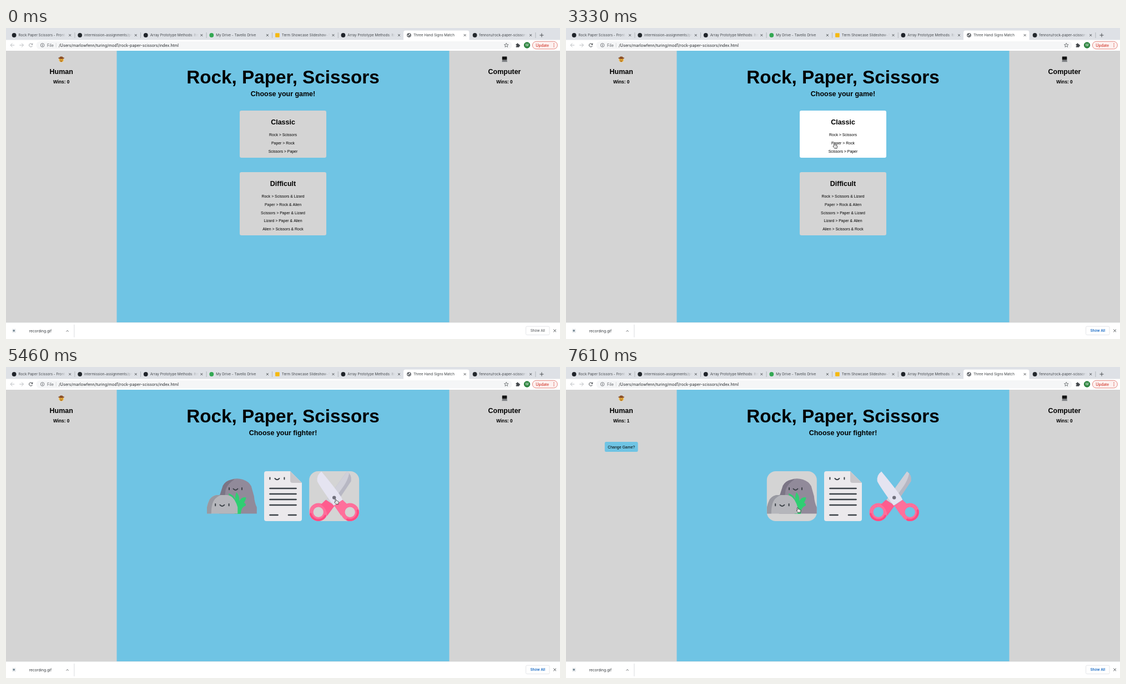
An HTML page with a canvas that plays this animation: 998 by 561 pixels, repeating every 8 s.

```html
<!DOCTYPE html>
<html lang="en">
<head>
<meta charset="utf-8">
<title>Hand game</title>
<style>
html, body { margin: 0; width: 100%; height: 100%; overflow: hidden; background: #fff; }
canvas { display: block; }
</style>
</head>
<body>
<canvas id="stage" width="998" height="561"></canvas>
<script>
const ctx = document.getElementById('stage').getContext('2d');
const LOOP = 8000;
const PAGE = '"Liberation Sans", Arial, sans-serif';
const UI = 'Inter, Roboto, sans-serif';
const BLUE = '#6fc4e4', GREY = '#d4d4d4', DARK = '#3b4147', ICON = '#5f6368';

// Moments at which the page switches state
const AWAKE = 2360, PICK = 4100, RESULT = 6060, AGAIN = 6940;

// Pointer moves: start, last change, number of steps, end x, end y
const START = [722, 440];
const MOVES = [
  [1500, 2260, 9, 520, 215],
  [2360, 2550, 3, 473, 179],
  [2640, 2840, 3, 476, 186],
  [3240, 4000, 9, 498, 284],
  [4100, 4300, 3, 525.5, 204],
  [4590, 4780, 3, 506, 236],
  [5180, 5460, 4, 591.5, 238],
  [6350, 6450, 2, 591, 238],
  [7240, 7610, 5, 415, 253]
];

function pointerAt(t) {
  let [x, y] = START;
  for (const [from, to, n, ex, ey] of MOVES) {
    if (t < from) break;
    const step = Math.floor((t - from) / (to - from) * (n - 1) + 0.1) + 1;
    const k = Math.min(1, step / n);
    x += (ex - x) * k;
    y += (ey - y) * k;
  }
  return { x, y };
}

function rect(x, y, w, h, fill, r = 0) {
  ctx.beginPath();
  ctx.roundRect(x, y, w, h, r);
  ctx.fillStyle = fill;
  ctx.fill();
}

function dot(x, y, r, fill) {
  ctx.beginPath();
  ctx.arc(x, y, r, 0, Math.PI * 2);
  ctx.fillStyle = fill;
  ctx.fill();
}

function ring(x, y, r, color, width, a = 0, b = Math.PI * 2) {
  ctx.beginPath();
  ctx.arc(x, y, r, a, b);
  ctx.strokeStyle = color;
  ctx.lineWidth = width;
  ctx.stroke();
}

function shape(d, fill, stroke, width = 1) {
  const p = new Path2D(d);
  if (fill) {
    ctx.fillStyle = fill;
    ctx.fill(p);
  }
  if (stroke) {
    ctx.strokeStyle = stroke;
    ctx.lineWidth = width;
    ctx.stroke(p);
  }
}

function text(s, x, y, font, color = '#000', align = 'center') {
  ctx.font = font;
  ctx.fillStyle = color;
  ctx.textAlign = align;
  ctx.fillText(s, x, y);
}

const bold = (s, x, y, size) => text(s, x, y, `bold ${size}px ${PAGE}`);
const plain = (s, x, y) => text(s, x, y, `6.93px ${PAGE}`);
const label = (s, x, y, size, color, weight = 400) =>
  text(s, x, y, `${weight} ${size}px ${UI}`, color, 'left');

function cross(x, y, r, color) {
  shape(`M${x - r} ${y - r}l${2 * r} ${2 * r}M${x + r} ${y - r}l${-2 * r} ${2 * r}`, null, color, 0.9);
}

const TABS = [
  ['Rock Paper Scissors - Front-End', '#20242a'],
  ['intermission-assignments/prework', '#24292e'],
  ['Array Prototype Methods: Iterators', '#20242a'],
  ['My Drive - Tavello Drive', '#34a853'],
  ['Term Showcase Slideshow-Final', '#f5b912', true],
  ['Array Prototype Methods: Iterators', '#20242a'],
  ['Three Hand Signs Match', null],
  ['fennoru/rock-paper-scissors', '#24292e']
];

function globe(x, y) {
  dot(x, y, 3.8, '#4d5156');
  shape(`M${x - 2.7} ${y - 1}l2.3 1.5l-.3 2l-1.6 -1zM${x} ${y - 2.9}l2.4 1.3l-1.2 1.8l-1.8 -1zM${x + 1} ${y + 1}l1.7 -.3l-1.4 2z`, '#fff');
}

function drawTabs() {
  rect(0, 0, 998, 22, '#dee1e6');
  rect(716, 4.5, 118.5, 20, '#fff', 4);
  TABS.forEach(([title, color, square], i) => {
    const x = 14.6 + 118.57 * i, active = i === 6;
    if (!color) globe(x, 13);
    else if (square) rect(x - 3.8, 9.2, 7.6, 7.6, color, 1);
    else dot(x, 13, 3.9, color);
    ctx.save();
    ctx.beginPath();
    ctx.rect(x + 7, 5, 86.5, 16);
    ctx.clip();
    label(title, x + 7.9, 15.2, 6.35, active ? '#3c4043' : '#45494d');
    const back = active ? '255,255,255' : '222,225,230';
    const fade = ctx.createLinearGradient(x + 82, 0, x + 93, 0);
    fade.addColorStop(0, `rgba(${back},0)`);
    fade.addColorStop(1, `rgb(${back})`);
    rect(x + 82, 6, 12, 14, fade);
    ctx.restore();
    cross(x + 100.6, 13, 2, '#4a4e52');
    if (i !== 5 && i !== 6) rect(x + 109, 8, 0.7, 10, '#a0a4a9');
  });
  shape('M961.5 13h7M965 9.5v7', null, '#4a4e52', 1);
}

function drawToolbar(awake) {
  rect(0, 21.5, 998, 19.5, '#fff');
  rect(54.5, 24, 857, 14.4, '#f5f6f7', 7.2);
  shape('M15.2 31H8M11.4 27.6L8 31l3.4 3.4', null, '#b9bcc0', 1);
  shape('M24.3 31h7.2M28.1 27.6l3.4 3.4l-3.4 3.4', null, '#b9bcc0', 1);
  const c = awake ? '#45494d' : '#a3a6aa';
  ring(44.7, 31, 3.1, c, 1, 0.4, 5.5);
  shape('M48.3 27.2v3.4h-3.4z', c);
  ring(65.6, 31, 3.3, ICON, 0.8);
  rect(65.1, 30.5, 1, 2.5, ICON);
  rect(65.1, 28.9, 1, 1, ICON);
  label('File', 74, 33.6, 7.2, ICON);
  rect(89.8, 27, 0.6, 8, '#c4c7ca');
  label('/Users/marlowfenn/turing/mod1/rock-paper-scissors/index.html', 95, 33.6, 7.16, '#25282b');

  ctx.beginPath();
  for (let i = 0; i < 10; i++) {
    const a = -Math.PI / 2 + i * Math.PI / 5, r = i % 2 ? 1.7 : 4;
    ctx.lineTo(901.3 + r * Math.cos(a), 31.2 + r * Math.sin(a));
  }
  ctx.closePath();
  ctx.strokeStyle = '#45494d';
  ctx.lineWidth = 0.7;
  ctx.stroke();
  rect(918.6, 29, 6, 5.7, '#45494d', 0.8);
  dot(921.5, 28.8, 1.3, '#45494d');
  dot(924.8, 31.8, 1.3, '#45494d');
  dot(918.8, 31.9, 1, '#fff');
  dot(938.6, 31, 5.7, '#2e8540');
  text('M', 938.6, 33.2, `6px ${UI}`, '#fff');
  rect(948.4, 24.3, 45, 13.6, '#fdf1f0', 6.8);
  ctx.strokeStyle = '#dc6a62';
  ctx.lineWidth = 0.8;
  ctx.stroke();
  label('Update', 954.3, 33.6, 6.9, '#d23a2e', 500);
  for (const y of [28.3, 31, 33.7]) dot(987, y, 0.75, '#d23a2e');
}

function drawDownloads(awake) {
  rect(0, 531, 998, 30, '#fff');
  rect(0, 531, 998, 0.6, '#d5d7da');
  rect(11, 542.5, 7, 7.5, '#eceef0', 1);
  dot(14.2, 546, 1.8, '#6a7f8c');
  label('recording.gif', 41.7, 549, 6.7, '#33373b');
  shape('M108.6 547.6l2 -2l2 2', null, '#55595d', 1);
  rect(122.6, 535, 0.7, 23, '#c9ccd0');
  rect(936.6, 538.2, 42.4, 15.4, '#fff', 2);
  ctx.strokeStyle = '#dadce0';
  ctx.lineWidth = 0.7;
  ctx.stroke();
  text('Show All', 957.8, 548.4, `${awake ? 600 : 400} 6.4px ${UI}`, awake ? '#1769c4' : '#44484c');
  cross(988.6, 546, 2.4, '#3c4043');
}

function drawSides(wins, button) {
  rect(0, 41, 199.5, 490, GREY);
  rect(798.5, 41, 199.5, 490, GREY);

  dot(99.6, 57.4, 4.2, '#f3b53a');
  shape('M94 54.6Q99.6 57.6 105.2 54.6Q104.6 53 102.8 53.4Q102.6 51 99.6 51.6Q96.6 51 96.4 53.4Q94.6 53 94 54.6z', '#8a4d26');
  dot(98, 57.6, 0.6, '#4a2c17');
  dot(101.2, 57.6, 0.6, '#4a2c17');
  shape('M97.4 59.2Q99.6 61.6 101.8 59.2z', '#6b3518');

  rect(893.8, 51.4, 8.6, 6.2, '#111', 0.6);
  shape('M894 58h8.4l.8 3.3h-10z', '#8d9094');
  shape('M894 59.2h8.6', null, '#44474a', 0.7);

  bold('Human', 99.7, 82.5, 12.48);
  bold('Wins: ' + wins, 99.7, 100, 8.32);
  bold('Computer', 898, 82.5, 12.48);
  bold('Wins: 0', 898, 100, 8.32);
  if (button) {
    rect(69.8, 135, 59.8, 18, BLUE, 2.5);
    plain('Change Game?', 99.7, 146.5);
  }
}

const CARDS = [
  { y: 149, h: 85, title: 'Classic', rows: ['Rock > Scissors', 'Paper > Rock', 'Scissors > Paper'] },
  { y: 260, h: 114, title: 'Difficult', rows: ['Rock > Scissors & Lizard', 'Paper > Rock & Alien',
    'Scissors > Paper & Lizard', 'Lizard > Paper & Alien', 'Alien > Scissors & Rock'] }
];

const inside = (p, x, y, w, h) => p.x >= x && p.x < x + w && p.y >= y && p.y < y + h;

function drawCards(p) {
  let over = false;
  for (const { y, h, title, rows } of CARDS) {
    const hot = p && inside(p, 421, y, 156, h);
    over = over || hot;
    rect(421, y, 156, h, hot ? '#fff' : GREY, 3);
    bold(title, 499, y + 24.7, 12.48);
    rows.forEach((row, i) => plain(row, 499, y + 46.2 + i * 14.75));
  }
  return over;
}

// Fighters are drawn in a 90 px square with its origin at the top left
function face(x, y, gap) {
  for (const s of [-1, 1]) rect(x + s * gap - 1, y - 2.6, 2, 5.2, DARK, 1);
  shape(`M${x - 4} ${y}Q${x} ${y + 4.6} ${x + 4} ${y}`, null, DARK, 2);
}

function rock() {
  shape('M22 76.5L22.5 46L29 26Q33 18 43 15.5Q53 11.5 65 15Q75 18 80 27L85 45Q86 57 90 65V76.5z', '#918a9a');
  shape('M22 60L22.5 46L29 26Q34 17 45 15L50 14.5Q38 22 34 33L31 55z', '#7b7585');
  face(51.7, 31.7, 11.5);
  shape('M50 77L39 40Q48 42 51 51Q51 43 53.5 38Q59 44 58.5 54Q63 45 71 47.5Q70 52 67 57Q71 58 70 62Q62 64 61 77z', '#2fce72');
  shape('M0.2 76.5V65Q2 57 5 51Q9 45 17 43H37Q45 44 50 52Q54 59 55.5 65L55.5 76.5z', '#b5b6bb');
  shape('M0.2 76.5V65Q2 57 5 51Q9 45 17 43H25Q13 48 10 59Q8 66 8 76.5z', '#9899a1');
  face(27.6, 60.7, 12.2);
}

function paper() {
  shape('M15 0H58L79 21V86Q79 90 75 90H15Q11 90 11 86V4Q11 0 15 0z', '#ebe9ec');
  shape('M58 0L79 21H62Q58 21 58 17z', '#c8c6ca');
  face(34.4, 13, 13);
  shape('M21.5 31H68.5M21.5 41H68.5M21.5 51H68.5M21.5 61H68.5M21.5 79H35.5M55 79H68.5', null, DARK, 2.7);
}

function scissors() {
  shape('M68 0.5Q77 6 75.5 18L46 62L31 52z', '#b7b7c3');
  shape('M68 0.5L72 4Q70 15 62 27L40 58L31 52z', '#d0d0d9');
  for (const x of [16.5, 73.5]) {
    ring(x, 73.8, 12.7, '#ff6f9b', 7);
    ring(x, 73.8, 14.2, '#ff4b82', 4, x < 45 ? 0.5 : -0.2, x < 45 ? 2.9 : 1.9);
  }
  shape('M30 51.5L46 62L32 81Q33 68 21 60z', '#ff5c8e');
  shape('M60 51.5L45 62L58 81Q57 68 69 60z', '#ff6f9b');
  shape('M22 0.5Q13 7 14.5 18Q18 26 44 62L60 51.5Q58 44 22 0.5z', '#e5e4f1');
  dot(45, 47.6, 3.2, '#70707c');
}

const FIGHTERS = [rock, paper, scissors];

function place(draw, x, hot) {
  ctx.save();
  ctx.translate(x, 188);
  if (hot) rect(0, 0, 90, 90, GREY, 16);
  ctx.lineCap = 'round';
  draw();
  ctx.restore();
}

function drawFighters(p) {
  let over = false;
  FIGHTERS.forEach((draw, i) => {
    const x = 361.8 + 92.2 * i, hot = p && inside(p, x, 188, 90, 90);
    over = over || hot;
    place(draw, x, hot);
  });
  return over;
}

function drawPointer({ x, y }, hand) {
  ctx.save();
  ctx.translate(x, y);
  ctx.lineJoin = 'round';
  if (hand) {
    shape('M1.3 1Q2.3 -.2 3 1L3.8 3.8Q4.8 3.2 5.3 4Q6.2 3.6 6.6 4.4Q7.6 4.2 7.8 5.2Q8 7.4 7 9.6H3.2Q2 8 .2 6Q.2 4.8 2 5.4z', '#fff', '#222', 0.8);
    shape('M4.2 6.3v2M5.6 6.3v2', null, '#444', 0.5);
  } else {
    shape('M0 0V8.2L1.9 6.5L3.2 9.4L4.6 8.8L3.3 6H5.8z', '#111', '#fff', 0.6);
  }
  ctx.restore();
}

function draw(t) {
  const awake = t >= AWAKE, result = t >= RESULT && t < AGAIN;
  const p = pointerAt(t);
  // Hover starts only once the window is active and the pointer moves over the page
  const hover = awake && !(t >= RESULT && t < 7240) ? p : null;

  rect(0, 0, 998, 561, BLUE);
  drawTabs();
  drawToolbar(awake);
  drawSides(t >= RESULT ? 1 : 0, t >= AGAIN);
  bold('Rock, Paper, Scissors', 499, 99.5, 33.27);
  const line = t < PICK ? 'Choose your game!' : result ? 'Human won this round!' : 'Choose your fighter!';
  bold(line, 499, 122.6, 12.48);

  let over = false;
  if (t < PICK) over = drawCards(hover);
  else if (result) {
    place(scissors, 407.9, false);
    place(paper, 500.1, false);
  } else over = drawFighters(hover);

  drawDownloads(awake);
  if (t >= 1500) drawPointer(p, over || (result && t < 6350));
}

const begin = performance.now();
function tick() {
  draw((performance.now() - begin) % LOOP);
  requestAnimationFrame(tick);
}
tick();
</script>
</body>
</html>
```
